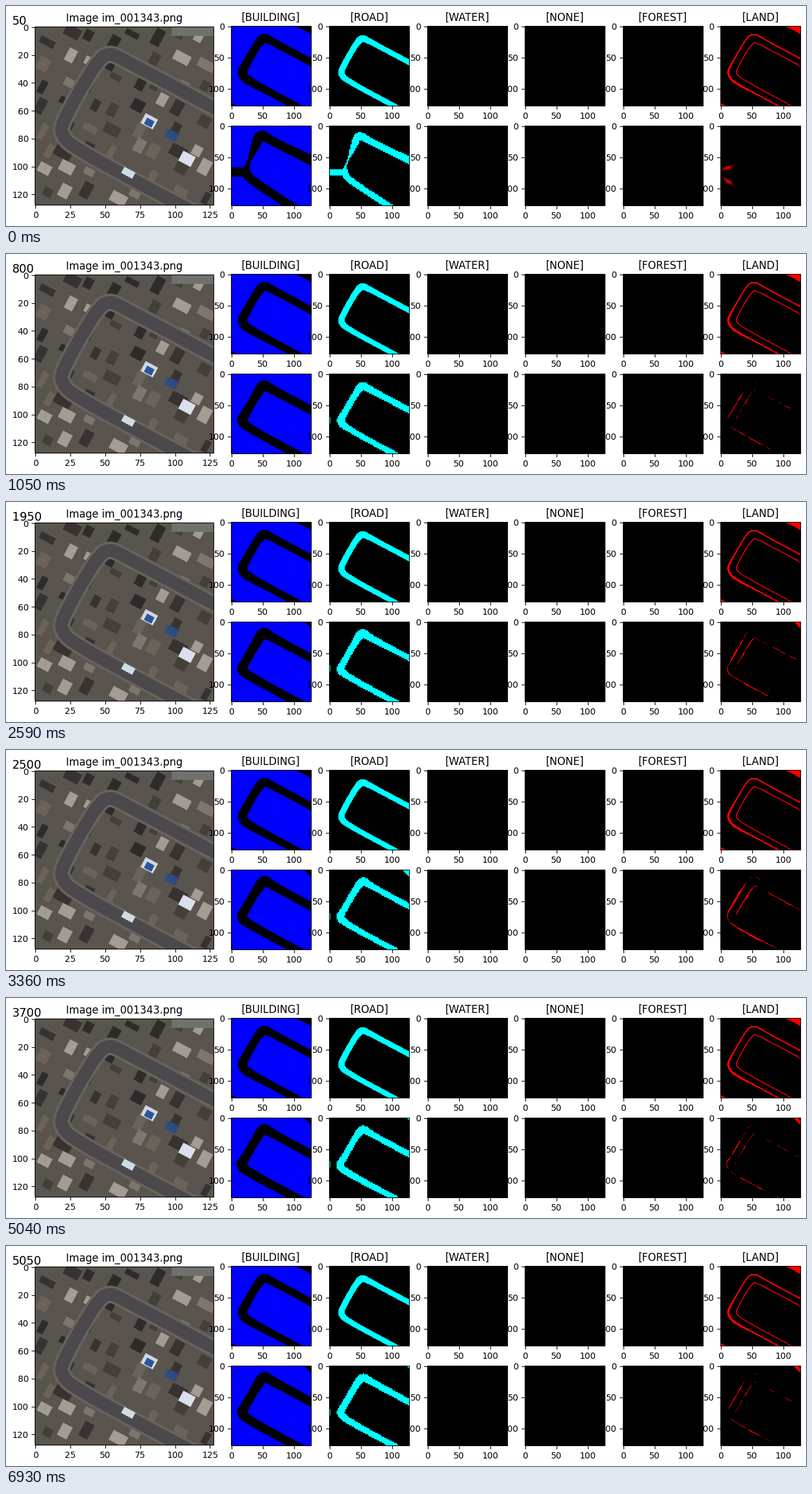
A matplotlib script that plays this animation: 1280x353 px, repeating every 7000 ms.

```python
import numpy as np
import matplotlib.pyplot as plt
from matplotlib.animation import FuncAnimation
from matplotlib.patches import Polygon, Rectangle

W, H, N = 1280, 353, 128
STEPS, INTERVAL = 100, 70
BLUE, CYAN, RED = (0, 0, 255), (0, 255, 255), (255, 0, 0)

plt.rcParams["font.family"] = "DejaVu Sans"
fig = plt.figure(figsize=(W / 100, H / 100), dpi=100, facecolor="white")
ax = fig.add_axes([0, 0, 1, 1])
ax.axis("off")

Y, X = np.mgrid[0:N, 0:N].astype(np.float32)

# road centre line: x, y, half width
ROAD = np.array([(134, 61.5, 4.4), (63, 23.5, 4.4), (52, 18, 6.2),
                 (42, 29, 4.8), (21, 66, 4.8), (18, 77, 5.5),
                 (29, 88, 4.3), (130, 142, 4.2)])
APEX, NECK, ELBOW = 2, 4, 5
SAMPLES = 120
S = np.linspace(0, 1, SAMPLES)


# ---------- geometry ----------
def bump(v, centre, width):
    return np.exp(-((v - centre) / width) ** 2)


def smooth(pts, rounds=3):
    """Round the corners, then space the samples evenly."""
    p = np.asarray(pts, float)
    for _ in range(rounds):
        a, b = p[:-1], p[1:]
        cut = np.stack([0.75 * a + 0.25 * b, 0.25 * a + 0.75 * b], 1)
        p = np.vstack([p[:1], cut.reshape(-1, p.shape[1]), p[-1:]])
    run = np.r_[0, np.cumsum(np.hypot(*np.diff(p[:, :2], axis=0).T))]
    return np.stack([np.interp(S * run[-1], run, c) for c in p.T], 1)


def survey(pts):
    """Distance to the road edge, side of the road, nearest sample."""
    px, py, pw = smooth(pts).astype(np.float32).T
    dx, dy = X[..., None] - px, Y[..., None] - py
    dist = np.sqrt(dx * dx + dy * dy) - pw
    near = dist.argmin(-1)
    tx, ty = np.gradient(px), np.gradient(py)
    outer = (Y - py[near]) * tx[near] > (X - px[near]) * ty[near]
    return dist.min(-1), outer, near


def corner(size):
    return X - N + size > Y


def paint(mask, color):
    return (np.asarray(mask, float)[..., None] * color).astype(np.uint8)


# ---------- panels ----------
def frame(x, y, size, xticks, yticks, title=None):
    k = size / N
    ax.add_patch(Rectangle((x, y), size, size, fill=False, ec="black",
                           lw=0.8, zorder=5))
    for v in xticks:
        tx = x + (v + 0.5) * k
        ax.plot([tx, tx], [y + size, y + size + 4.9], "k-", lw=0.8, zorder=5)
        ax.text(tx, y + size + 9.7, str(v), ha="center", va="top",
                fontsize=10, zorder=6)
    for v in yticks:
        ty = y + (v + 0.5) * k
        ax.plot([x - 4.9, x], [ty, ty], "k-", lw=0.8, zorder=5)
        ax.text(x - 9.7, ty, str(v), ha="right", va="center_baseline",
                fontsize=10, zorder=6)
    if title:
        ax.text(x + size / 2, y - 8.3, title, ha="center", va="baseline",
                fontsize=12, zorder=6)


def mask_image(x, y, data):
    return ax.imshow(data, extent=(x, x + N, y + N, y), aspect="auto",
                     origin="upper", interpolation="nearest", zorder=2)


# ---------- aerial view, simplified to flat shapes ----------
def aerial(x, y, size):
    k = size / N
    clip = Rectangle((x, y), size, size, fc="#5a544f", ec="none", zorder=1)
    ax.add_patch(clip)

    def block(cx, cy, w, h, color, deg=28, z=2):
        a = np.radians(deg)
        box = np.array([(-w, -h), (w, -h), (w, h), (-w, h)]) / 2
        turn = np.array([(np.cos(a), np.sin(a)), (-np.sin(a), np.cos(a))])
        patch = Polygon((box @ turn + (cx, cy)) * k + (x, y), fc=color,
                        ec="none", zorder=z)
        ax.add_patch(patch)
        patch.set_clip_path(clip)

    rng = np.random.default_rng(7)
    tones = ["#383330", "#7d766f", "#2f2b29", "#a39c95", "#6b625a", "#453f3a"]
    for i in range(64):
        cx, cy = 16 * np.array([i % 8 + 0.5, i // 8 + 0.5])
        dx, dy = rng.uniform(-4, 4, 2)
        block(cx + dx, cy + dy, rng.uniform(6, 13), rng.uniform(4, 9),
              rng.choice(tones), 28 + 90 * rng.integers(2))

    line = smooth(ROAD)[:, :2] * k + (x, y)
    for width, color in ((20, "#69625d"), (14.5, "#4b494b")):
        road, = ax.plot(*line.T, color=color, lw=width, zorder=3)
        road.set_clip_path(clip)

    block(115, 2, 34, 9, "#6f716b", 0)
    block(82, 68, 10, 8, "#d2d8e2", z=4)
    block(82, 69, 6, 5, "#2c549c", z=4)
    block(98, 78, 9, 6, "#2d4b85", z=4)
    block(109, 95, 10, 8, "#d9dfec", z=4)
    block(67, 105, 9, 5, "#cfdde4", z=4)


aerial(46, 33, 286)
frame(46, 33, 286, range(0, 126, 25), range(0, 121, 20), "Image im_001343.png")

# ---------- ground truth ----------
edge, outer, near = survey(ROAD)
street = edge < 0
kerb = np.where(outer, 2 + 1.5 * bump(S[near], 0.58, 0.1), 1.4)
clear = (edge < kerb) | (X - 104 > 1.9 * Y) | (X + 1.8 * (N - Y) < 9)
truth = {"BUILDING": paint(~clear, BLUE), "ROAD": paint(street, CYAN),
         "LAND": paint(clear & ~street, RED)}

# ---------- predictions ----------
# how far the untrained guess is from the road
FIRST_GUESS = np.array([(0, -3.5, 1.8), (0, 0, 0.5), (-6, -6, 0.5),
                        (-4, 4, 0.5), (6, -7, -5), (4, -1, 0.5),
                        (6, 1, 0.5), (-14, 0, 1)])
OUTER_VERGE = 2.4 * bump(S, 0.45, 0.1) + 2 * bump(S, 0.7, 0.12)
INNER_VERGE = 1.7 * bump(S, 0.42, 0.12) + 1.2 * bump(S, 0.12, 0.12)


def soft_spot(cx, cy, deg):
    a = np.radians(deg)
    u = (X - cx) * np.cos(a) + (Y - cy) * np.sin(a)
    v = (Y - cy) * np.cos(a) - (X - cx) * np.sin(a)
    return bump(u, 0, 8) * bump(v, 0, 2.6)


SPOTS = np.clip(soft_spot(11, 67, -18) + soft_spot(12, 89, 36), 0, 1)


def predict(step):
    rng = np.random.default_rng(step)
    early = np.exp(-step / 4)
    swell = 0.25 + 0.75 * bump(step, 61, 7)

    pts = ROAD + early * FIRST_GUESS
    pts[:, 2] += 0.5 * (1 - early)
    pts[APEX] += (1 - early) * swell * np.array([0, -6, 3])
    pts[ELBOW] += (1 - early) * swell * np.array([-11, -4, 2])
    pts += (1 - early) * rng.normal(0, 0.3, pts.shape)
    edge, outer, near = survey(pts)

    # early on a stub runs to the left border
    reach = 26 * early
    stub = np.hypot(np.maximum(X - reach, 0), Y - 74) - 6
    edge = np.where(X < 30 * early, np.minimum(edge, stub), edge)

    learned = 1 - np.exp(-max(step - 20, 0) / 8)
    cleared = corner(12 * learned)
    paved = corner(12 * bump(step, 48, 7) + 5 * learned * (step > 48))
    left = X + Y / 3 < 9 * bump(step, 61, 8)
    road = (edge < 0)[::2, ::2].repeat(2, 0).repeat(2, 1) | paved
    built = ~((edge < 2) | cleared | left)

    level = (1 - early) * (0.85 + 0.75 * bump(step, 46, 9))
    phase = rng.uniform(0, 2 * np.pi, 2)
    ripple = 0.35 * (np.sin(60 * S + phase[0]) + np.sin(115 * S + phase[1]))
    strip = np.where(outer, OUTER_VERGE[near], INNER_VERGE[near])
    verge = (edge > 0) & (edge < level * strip + ripple[near] - 0.6)
    verge |= cleared & ~paved
    glow = SPOTS * np.exp(-step / 2)
    return (paint(built, BLUE), paint(road, CYAN),
            paint(np.maximum(verge, glow), RED))


# ---------- stage ----------
TOP, LOW = 32, 192
live = []
for col, name in enumerate(["BUILDING", "ROAD", "WATER", "NONE", "FOREST",
                            "LAND"]):
    x = round(360.4 + 156.6 * col)
    for y, label in ((TOP, f"[{name}]"), (LOW, None)):
        frame(x, y, N, (0, 50, 100), (0, 50, 100), label)
        ax.add_patch(Rectangle((x, y), N, N, fc="black", ec="none", zorder=1))
    if name in truth:
        mask_image(x, TOP, truth[name])
        live.append(mask_image(x, LOW, truth[name]))

counter = ax.text(10, 29.6, "", fontsize=13.4, va="baseline", zorder=7)
ax.set_xlim(0, W)
ax.set_ylim(H, 0)


def update(step):
    # one reading of the counter is skipped
    counter.set_text(str(50 * (step + 1 + (step >= 26))))
    for image, data in zip(live, predict(step)):
        image.set_data(data)
    return [counter, *live]


anim = FuncAnimation(fig, update, frames=STEPS, interval=INTERVAL,
                     repeat=True, repeat_delay=0)
plt.show()
```
